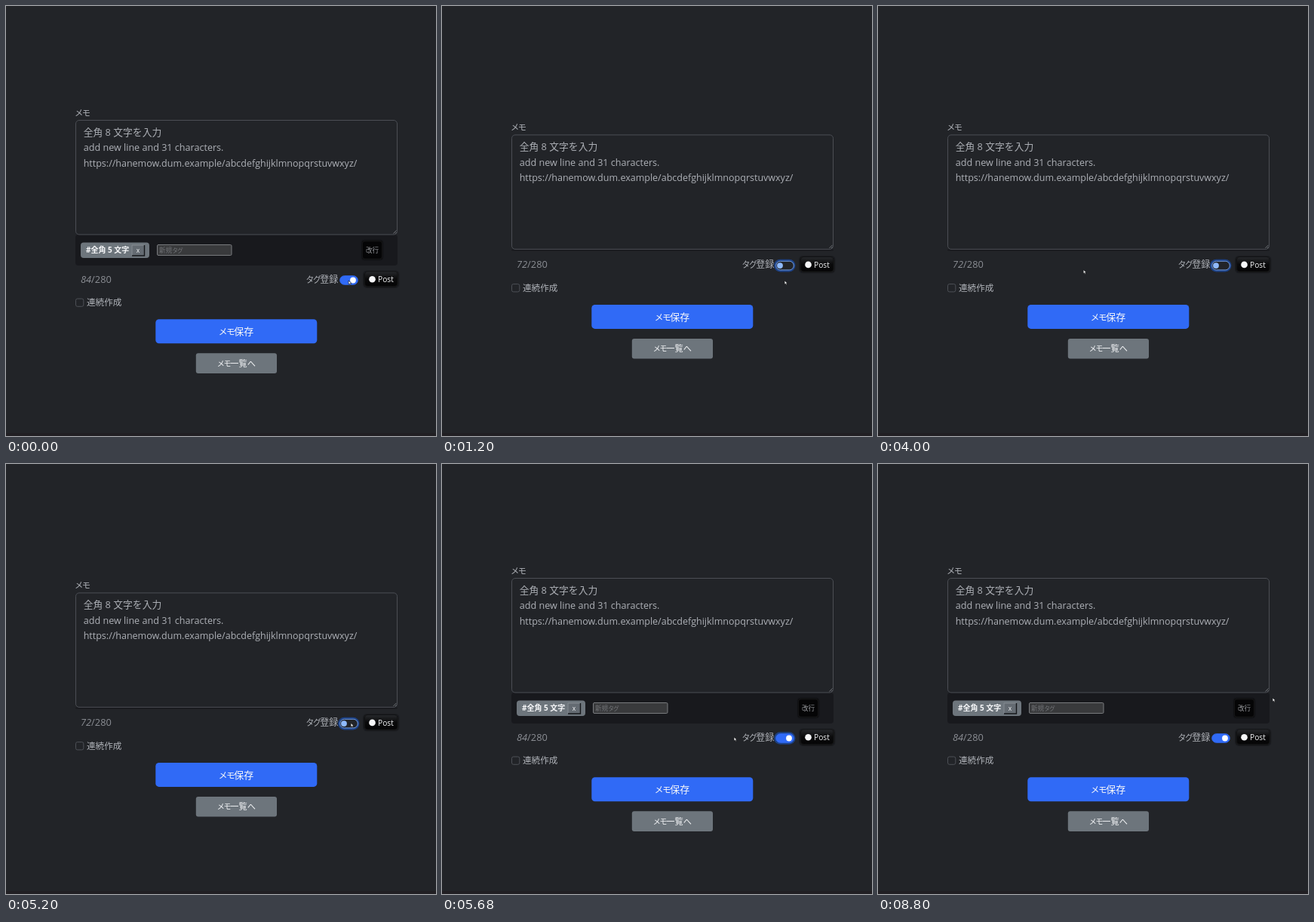
Write an HTML page that moves like this. It is 570 px wide and 570 px high and loops after 8880 ms.

```html
<!DOCTYPE html>
<html lang="ja">
<head>
<meta charset="utf-8">
<title>メモ</title>
<style>
  html, body { margin: 0; width: 100%; height: 100%; overflow: hidden; background: #222428; }
  svg { display: block; width: 100vw; height: 100vh; }
  text { font: 12.5px "Open Sans", "Noto Sans CJK JP", "Noto Sans CJK", sans-serif; fill: #adb0b6; white-space: pre; }
  .kana tspan { font-size: .9em; letter-spacing: -.13em; }
  .mid { text-anchor: middle; }
  .white { fill: #f6f7f9; }
  .count { fill: #8b8e94; }
</style>
</head>
<body>
<svg viewBox="0 0 570 570">
  <defs>
    <linearGradient id="dark" x2="0" y2="1">
      <stop stop-color="#25272a"/><stop offset=".5" stop-color="#0a0a0b"/><stop offset="1" stop-color="#050506"/>
    </linearGradient>
    <filter id="soft" x="-30%" y="-30%" width="160%" height="160%"><feGaussianBlur stdDeviation="1.3"/></filter>
    <clipPath id="clip"><rect id="clipBox" x="92" y="-3" width="427"/></clipPath>
  </defs>
  <rect width="570" height="570" fill="#222428"/>
  <rect y="566" width="570" height="4" fill="#211f23"/>

  <rect id="bar" x="92" width="427" rx="4" fill="#18191d"/>
  <g id="tags">
    <g clip-path="url(#clip)">
      <rect x="99" y="2.5" width="91" height="20.5" rx="4" fill="#6d757c"/>
      <text class="white" x="106" y="16" style="font-size:10px;font-weight:700">#全角 5 文字</text>
      <rect x="167" y="6" width="16.5" height="14" fill="#646b72"/>
      <path d="M167 20V6h16.5" fill="none" stroke="#858c92"/>
      <path d="M167 20h16.5V6" fill="none" stroke="#15171a" stroke-width="1.4"/>
      <text class="white mid" x="175" y="16.3" style="font-size:8.5px">x</text>
      <rect x="200.5" y="5.5" width="98.5" height="14" rx="1.5" fill="#393a3c" stroke="#797b7e"/>
      <text class="kana" x="203" y="15.5" style="font-size:8.6px;fill:#707276">新規タグ</text>
      <rect x="472" y="0" width="27" height="25" rx="3" fill="#08080a" filter="url(#soft)"/>
      <rect x="473" y="1.5" width="25" height="22" rx="3" fill="#050506"/>
      <text class="mid" x="485.5" y="16" style="font-size:8.6px;fill:#9a9ca0">改行</text>
    </g>
  </g>

  <g id="upper">
    <text class="kana" x="91" y="146">メモ</text>
    <rect x="92.5" y="151.5" width="426" height="151.5" rx="4.5" fill="#222428" stroke="#4b4e54"/>
    <path d="M513.5 301.5l4-4M516 301.5l1.5-1.5" stroke="#85888d" stroke-width=".8"/>
    <text x="102.7" y="172" style="font-size:12.8px">全角 8 文字を入力</text>
    <text x="102.7" y="192.4" style="font-size:12.6px">add new line and 31 characters.</text>
    <text x="102.7" y="212.7">https://hanemow.dum.example/abcdefghijklmnopqrstuvwxyz/</text>
  </g>

  <g id="lower">
    <text class="count" x="99" y="366.5" style="font-size:12.8px"><tspan id="count" font-style="italic">84</tspan>/280</text>
    <text class="kana" x="397.5" y="366.5" style="font-size:12px">タグ登録</text>
    <rect id="glow" x="440" y="355.2" width="28.5" height="16.6" rx="8.3" fill="#1d4184"/>
    <rect id="track" x="442.7" y="357.7" width="23.6" height="11.6" rx="5.8" stroke-width=".9"/>
    <circle id="knob" cy="363.5"/>
    <rect x="474.5" y="352" width="45.5" height="20.5" rx="4" fill="#0b0b0d" filter="url(#soft)"/>
    <rect x="476" y="352.5" width="42.5" height="18.5" rx="4" fill="url(#dark)"/>
    <circle class="white" cx="485.5" cy="362.3" r="4.3"/>
    <text class="white" x="493" y="366" style="font-size:10.2px">Post</text>
    <rect x="92.5" y="388" width="10.3" height="10.3" rx="2.2" fill="none" stroke="#4d5056"/>
    <text x="107" y="397.4" style="font-size:11.6px">連続作成</text>
    <rect x="198.3" y="415.3" width="214" height="32" rx="4.5" fill="#306af6"/>
    <text class="white mid kana" x="305" y="436.2" style="font-size:13px">メモ保存</text>
    <rect x="251.8" y="460.3" width="107.2" height="26.7" rx="3" fill="#6d757c"/>
    <text class="white mid kana" x="305.3" y="477.8" style="font-size:11.2px">メモ一覧へ</text>
  </g>
  <path id="cursor" d="M0 0L.2 5L1.4 4L2.4 5.8L3.2 5.3L2.4 3.6L3.9 3.4Z" fill="#fff" stroke="#0d0e10" stroke-width=".6"/>
</svg>
<script>
  const LOOP = 8880, STEP = 80, SHIFT = 19.4;
  const PRESS = 400, OFF = 540, ON = 5280, BLUR = 6320, SLIDE = 400;

  // Pointer stops: time, x, y
  const path = [
    [0, 454, 364], [1280, 454, 364], [1360, 450, 363], [1760, 370, 354], [2240, 201, 347],
    [2400, 150, 352], [2640, 100, 354], [2880, 130, 355], [3120, 105, 355], [3280, 120, 355],
    [3600, 145, 354], [4160, 323, 348], [4320, 323, 348], [4880, 457, 343.5], [5360, 457, 343.5],
    [5680, 387, 362], [5920, 386, 363], [6160, 190, 366], [6400, 112, 369], [6800, 139, 371],
    [7040, 108, 370], [7360, 136, 371], [7600, 104, 370], [8160, 287, 360], [8800, 523, 310]
  ];

  const $ = id => document.getElementById(id);
  const set = (id, attrs) => {
    for (const name in attrs) $(id).setAttribute(name, attrs[name]);
  };
  const clamp = v => Math.min(1, Math.max(0, v));

  // Katakana is set smaller and tighter than kanji
  for (const el of document.querySelectorAll('.kana'))
    el.innerHTML = el.textContent.replace(/[ァ-ヺ]+/g, '<tspan>$&</tspan>');

  // CSS "ease": cubic-bezier(.25, .1, .25, 1)
  function ease(x) {
    if (x <= 0 || x >= 1) return clamp(x);
    const bezier = (a, b, s) => 3 * a * s * (1 - s) ** 2 + 3 * b * s * s * (1 - s) + s ** 3;
    let lo = 0, hi = 1;
    for (let i = 0; i < 20; i++) {
      const mid = (lo + hi) / 2;
      if (bezier(.25, .25, mid) < x) lo = mid; else hi = mid;
    }
    return bezier(.1, 1, lo);
  }

  const openness = (t, duration) =>
    1 - ease((t - OFF) / duration) + ease((t - ON) / duration);

  function pointer(t) {
    const i = path.findIndex(p => p[0] > t);
    if (i < 0) return path[path.length - 1].slice(1);
    const [a, b] = [path[i - 1], path[i]];
    const k = (t - a[0]) / (b[0] - a[0]);
    return [a[1] + (b[1] - a[1]) * k, a[2] + (b[2] - a[2]) * k];
  }

  function draw(t) {
    const p = openness(t, SLIDE), d = SHIFT * (1 - p);
    const on = t < OFF || t >= ON, focus = t >= PRESS && t < BLUR;
    const knob = openness(t, 150);

    set('upper', { transform: `translate(0 ${d})` });
    set('lower', { transform: `translate(0 ${-d})` });
    set('bar', { y: 303 + d, height: 41 - 2 * d });
    set('tags', { transform: `translate(0 ${303 + d + 8 * p})` });
    set('clipBox', { height: p > .99 ? 33 : Math.max(0, 3 + 25 * (p - .13) / .87) });

    $('count').textContent = on ? 84 : 72;
    set('glow', { opacity: focus ? 1 : 0 });
    set('track', { fill: on ? '#306af6' : '#222428', stroke: on ? '#306af6' : '#7ea9ee' });
    set('knob', { cx: 448 + 12 * knob, r: 3.9, fill: on ? '#fff' : '#8fbaff' });
    set('cursor', { transform: `translate(${pointer(t)})` });
  }

  const start = performance.now();
  function tick() {
    const t = (performance.now() - start) % LOOP;
    draw(Math.floor(t / STEP) * STEP);
    requestAnimationFrame(tick);
  }
  tick();
</script>
</body>
</html>
```
